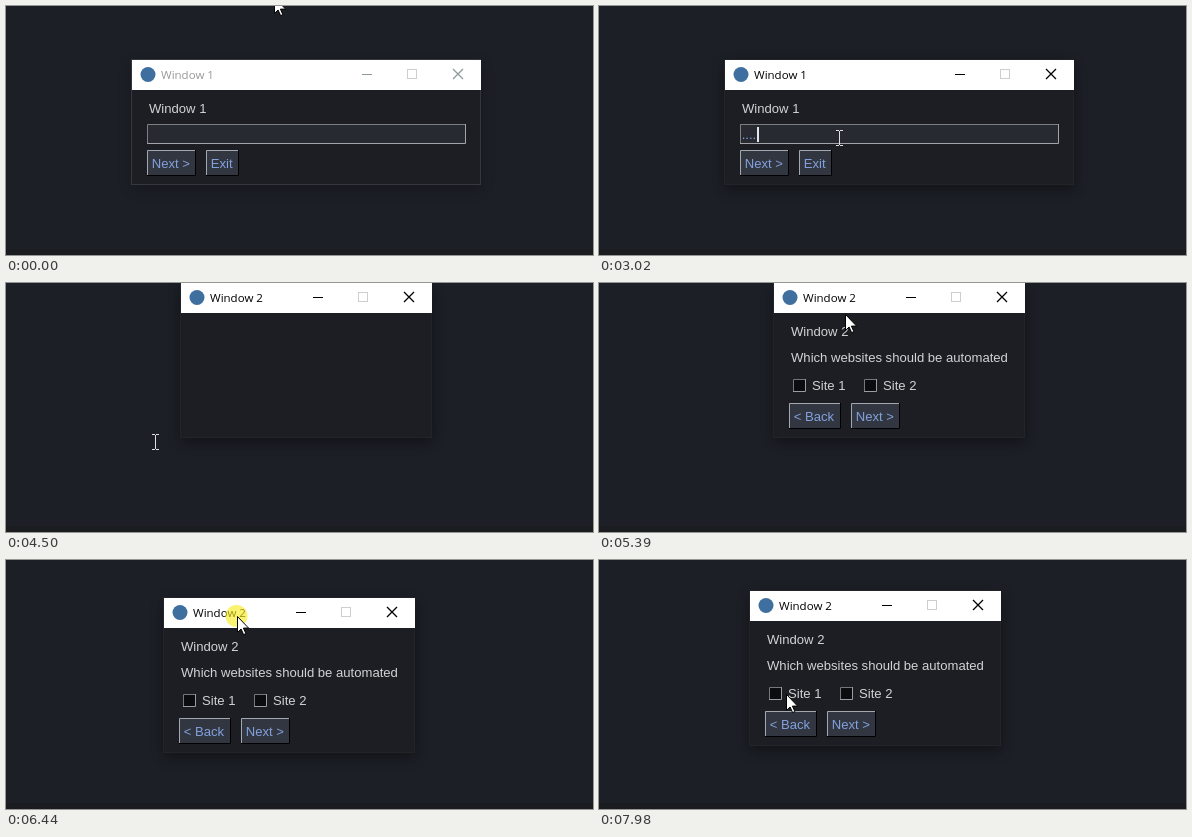
Recreate the animation shown at these times as an HTML page. Size 587 px wide and 249 px high, loop 8 s.

```html
<!DOCTYPE html>
<html lang="en">
<head>
<meta charset="utf-8">
<title>Two windows</title>
<style>
html, body { margin: 0; width: 100%; height: 100%; overflow: hidden; background: #1c1f26; }
svg { display: block; }
text { font: 13.1px "Liberation Sans", Arial, sans-serif; fill: #d2d3d5; white-space: pre; }
.title { font: 11.5px "Open Sans", "Noto Sans", sans-serif; fill: #000; }
.tools { stroke: #000; fill: none; }
.cross { stroke-width: 1.3; }
.inactive .title { fill: #999; }
.inactive .tools { stroke: #8c9a9a; }
.btn text, .typed { fill: #83a1dd; }
.frame { fill: none; stroke: #222428; }
.inactive .frame { stroke: #34373d; }
</style>
</head>
<body>
<svg id="stage" width="587" height="249" viewBox="0 0 587 249"></svg>
<script>
const LOOP = 8000;

const rect = (x, y, w, h, fill) =>
  `<rect x="${x}" y="${y}" width="${w}" height="${h}" fill="${fill}"/>`;
const label = (x, y, s, cls = '') => `<text class="${cls}" x="${x}" y="${y}">${s}</text>`;

// box with separate colours for its top-left and bottom-right edges
const bevel = (x, y, w, h, fill, light, dark) =>
  rect(x, y, w, h, fill) +
  `<path class="tl" fill="none" stroke="${light}" d="M${x + .5} ${y + h - 1}V${y + .5}H${x + w - 1}"/>` +
  `<path class="br" fill="none" stroke="${dark}" d="M${x} ${y + h - .5}H${x + w - .5}V${y}"/>`;

const button = (x, y, w, s) =>
  `<g class="btn">${bevel(x, y, w, 26, '#313641', '#a3a7ae', '#000')}${label(x + 4.7, y + 18, s)}</g>`;

const checkbox = (x, y, s) =>
  bevel(x, y, 13, 13, '#0b0c10', '#74777c', '#9a9da2') + label(x + 19, y + 11, s);

const win = (id, w, h, title, body) => `
  <g id="${id}">
    <rect class="shadow" y="4" width="${w}" height="${h}" opacity=".42" filter="url(#blur)"/>
    ${rect(0, 0, w, h, '#1c1e23')}
    <rect class="frame" x="-.5" y="-.5" width="${w}" height="${h}"/>
    ${rect(0, 0, w, 30, '#fff')}
    <circle cx="16" cy="14.5" r="7.5" fill="#3f6f9f"/>
    ${label(29, 19, title, 'title')}
    <path class="tools" d="M${w - 119} 14.5h10"/>
    <rect x="${w - 73.5}" y="9.5" width="9" height="9" fill="none" stroke="#ccd0cc"/>
    <path class="tools cross" d="M${w - 28} 9l10 10m0-10l-10 10"/>
    <g class="body">${label(17, 53, title)}${body}</g>
  </g>`;

const stage = document.getElementById('stage');
stage.innerHTML = `
  <defs><filter id="blur" x="-20%" y="-30%" width="140%" height="160%"><feGaussianBlur stdDeviation="7"/></filter></defs>
  ${rect(0, 0, 587, 249, '#1c1f26')}
  ${rect(0, 243, 587, 6, '#1b1c20')}
  ${win('first', 349, 125, 'Window 1',
    bevel(15, 64, 319, 20, '#272a31', '#7c7e82', '#a2a4a7') +
    label(16.7, 79, '', 'typed') +
    '<rect id="caret" y="67" width="2" height="15" fill="#e4e5e8"/>' +
    button(15, 90, 49, 'Next &gt;') + button(74, 90, 33, 'Exit'))}
  ${win('second', 251, 155, 'Window 2',
    label(17, 79, 'Which websites should be automated') +
    checkbox(19, 96, 'Site 1') + checkbox(90, 96, 'Site 2') +
    button(15, 120, 52, '&lt; Back') + button(77, 120, 49, 'Next &gt;'))}
  <circle id="press" cx="-.5" r="11" fill="#f6ec20" opacity=".64"/>
  <path id="arrow" d="M.5.5V16.4L4.1 13l2.5 5.6 2.3-1L6.4 12.1h5.2Z" fill="#fff" stroke="#000"/>
  <path id="beam" d="M-3 -7.5h3m1 0h3M-3 7.5h3m1 0h3M.5 -7V7" stroke="#dfe0e3" fill="none"/>`;

const $ = s => stage.querySelector(s);
const first = $('#first'), second = $('#second'), caret = $('#caret'), typed = $('.typed');
const press = $('#press'), arrow = $('#arrow'), beam = $('#beam');
const body2 = $('#second .body');

const clamp = (v, a, b) => Math.min(b, Math.max(a, v));
const ramp = (t, a, b) => clamp((t - a) / (b - a), 0, 1);
const linear = u => u;
const smooth = u => u * u * (3 - 2 * u);
const out = u => 1 - (1 - u) ** 3;

// each move leads from the place before it; bend bows the way sideways
const START = [268, -9];
const move = (from, till, to, ease = smooth, bend = [0, 0]) => ({ from, till, to, ease, bend });
const moves = [
  move(160, 890, [240, 125], smooth, [24, 0]),
  move(1130, 1500, [240, 132]),
  move(3100, 3850, [143, 161], smooth, [0, 16]),
  move(4140, 4400, [149, 159]),
  move(4730, 5610, [248, 29], out),
  move(5710, 5850, [248, 18]),
  move(5970, 6510, [229, 62], linear),
  move(6660, 7230, [224, 49], linear, [-1, 0]),
  move(7230, 7970, [187, 134], out)
];

function pointer(t) {
  let place = START;
  for (const m of moves) {
    if (t < m.from) break;
    const s = m.ease(ramp(t, m.from, m.till));
    const bow = Math.sin(Math.PI * s);
    place = place.map((p, k) => p + (m.to[k] - p) * s + m.bend[k] * bow);
  }
  return place.map(Math.round);
}

// title bar drag
const GRAB = 5850, DROP = 7230, GRIP = [73, 18];
const secondPlace = t => pointer(clamp(t, GRAB, DROP)).map((p, k) => p - GRIP[k]);

const ACTIVATE = 1000, FOCUS = 1750, NEXT = 4040, CLICK = 100;
const clicked = t => [ACTIVATE, FOCUS, NEXT].some(c => t >= c && t < c + CLICK);

const TYPE = 2500, KEY = 173, DOTS = 4;

const place = (el, x, y, scale = 1) =>
  el.setAttribute('transform', `translate(${x} ${y}) scale(${scale})`);
const show = (el, on) => el.setAttribute('display', on ? 'inline' : 'none');

// grows from its centre while fading in or out
function zoom(el, x, y, w, h, k) {
  const s = .9 + .1 * k;
  el.setAttribute('opacity', k);
  show(el, k > 0);
  place(el, x + w * (1 - s) / 2, y + h * (1 - s) / 2, s);
}

function overText(x, y, t, x2, y2) {
  const inside = (l, top, w, h) => x >= l && x < l + w && y >= top && y < top + h;
  if (t > 4340) return !inside(x2, y2, 251, 155);
  return inside(126, 54, 349, 125) ? inside(141, 118, 319, 20) : y >= 0;
}

function drawInput(t) {
  const count = clamp(Math.floor((t - TYPE) / KEY) + 1, 0, DOTS);
  const touched = count ? TYPE + (count - 1) * KEY : FOCUS;
  typed.textContent = '.'.repeat(count);
  caret.setAttribute('x', 16 + 4 * count);
  show(caret, t >= FOCUS && (t - touched) % 900 < 600);
}

function draw(t) {
  const [x, y] = pointer(t);
  const [x2, y2] = secondPlace(t);

  first.setAttribute('class', t < ACTIVATE ? 'inactive' : '');
  $('#first .shadow').setAttribute('opacity', .25 + .17 * ramp(t, ACTIVATE, 1250));
  zoom(first, 126, 54, 349, 125, 1 - ramp(t, 4200, 4340));
  zoom(second, x2, y2, 251, 155, out(ramp(t, 4300, 4480)));
  show(body2, t >= 4520);
  drawInput(t);

  const text = overText(x, y, t, x2, y2);
  show(press, clicked(t) || (t >= GRAB && t < DROP));
  show(beam, text);
  show(arrow, !text);
  [press, beam, arrow].forEach(el => place(el, x, y));
}

function tick() {
  draw(performance.now() % LOOP);
  requestAnimationFrame(tick);
}
tick();
</script>
</body>
</html>
```
